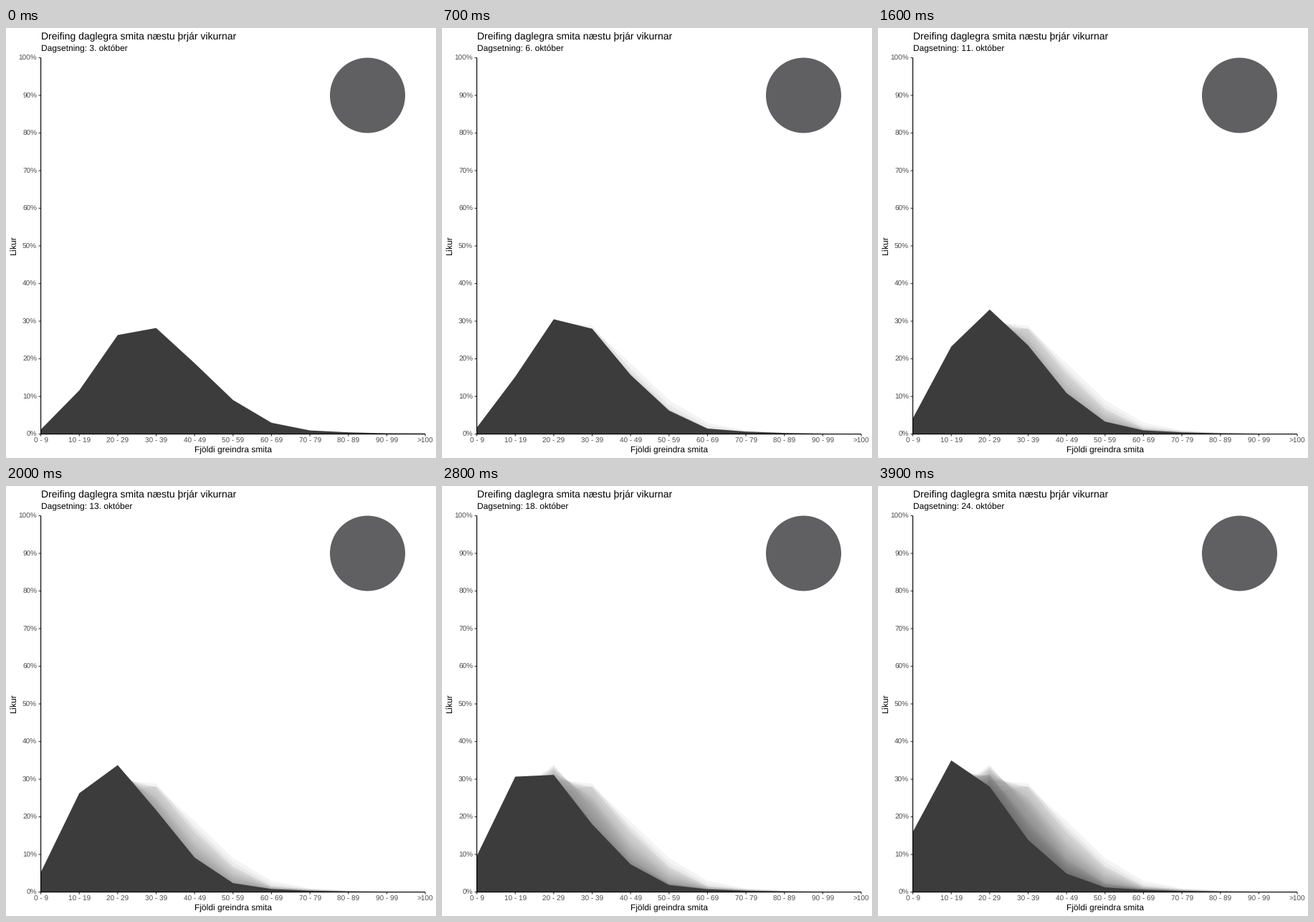
Write a matplotlib script that moves like this. It is 600 px wide and 600 px high and loops after 4 s.

```python
from math import erf, sqrt

import numpy as np
import matplotlib.pyplot as plt
from matplotlib.animation import FuncAnimation
from matplotlib.patches import Circle, Polygon

plt.rcParams["font.family"] = "Liberation Sans"
plt.rcParams["text.hinting"] = "none"
plt.rcParams["text.hinting_factor"] = 1

FRAMES, LAST_DAY, FIRST_DATE = 40, 21, 3
LEFT, RIGHT, TOP, BOTTOM = 48.6, 585, 41.5, 566.6
BIN_X = np.linspace(LEFT, RIGHT, 11)
EDGES = np.arange(10, 101, 10)

# The root of the daily count is roughly normal: its centre falls over
# three weeks while its sharpness wavers and then drops.
DAYS = [0, 2, 3, 6, 11, 13, 17, 21]
CENTRE = [5.80, 5.57, 5.62, 5.34, 5.01, 4.87, 4.69, 4.44]
SHARPNESS = [0.855, 0.875, 0.90, 0.855, 0.87, 0.805, 0.81, 0.778]


def bin_percents(day):
    centre = np.interp(day, DAYS, CENTRE)
    sharpness = np.interp(day, DAYS, SHARPNESS)
    z = sharpness * (np.sqrt(EDGES) - centre)
    z = np.minimum(z, 0.78 + 0.6 * z)  # heavier upper tail
    below = [0.5 + 0.5 * erf(v / sqrt(2)) for v in z]
    return 100 * np.diff([0, *below, 1])


def y_of(percent):
    return BOTTOM - (BOTTOM - TOP) * percent / 100


def outline(day):
    """Area under the curve, linear between whole days."""
    start = min(int(day), LAST_DAY - 1)
    part = day - start
    values = (1 - part) * bin_percents(start) + part * bin_percents(start + 1)
    top = np.column_stack([BIN_X, y_of(values)])
    return np.vstack([[LEFT, BOTTOM], top, [RIGHT, BOTTOM]])


fig = plt.figure(figsize=(6, 6), dpi=100, facecolor="white")
ax = fig.add_axes([0, 0, 1, 1])
ax.set(xlim=(0, 600), ylim=(600, 0))
ax.axis("off")


def label(x, y, text, px, color="black", **kw):
    return ax.text(x, y, text, fontsize=px * 0.72, color=color,
                   va="baseline", **kw)


def line(xs, ys, color="black", px=1.16):
    ax.plot(xs, ys, color=color, lw=px * 0.72, zorder=5,
            solid_capstyle="butt", snap=False)


# Past days stay behind as faint layers.
shadows = [
    ax.add_patch(Polygon(outline(day), fc="#333333", alpha=0.05, lw=0,
                         zorder=1))
    for day in range(LAST_DAY)
]
area = ax.add_patch(Polygon(outline(0), fc="#3c3c3c", lw=0, zorder=2))

for percent in range(0, 101, 10):
    y = y_of(percent)
    line([LEFT - 3, LEFT], [y, y], "#333333")
    label(LEFT - 5.5, y + 3.5, f"{percent}%", 9.6, "#4d4d4d", ha="right")

for i, x in enumerate(BIN_X):
    line([x, x], [BOTTOM, BOTTOM + 3], "#333333")
    name = f"{10 * i} - {10 * i + 9}" if i < 10 else ">100"
    label(x, 579, name, 9.6, "#4d4d4d", ha="center")

line([LEFT, LEFT], [TOP, BOTTOM + 0.5])
line([LEFT - 0.5, RIGHT], [BOTTOM, BOTTOM])

label(LEFT, 16, "Dreifing daglegra smita næstu þrjár vikurnar", 14.4)
subtitle = label(LEFT, 33, "", 12)
label((LEFT + RIGHT) / 2, 593, "Fjöldi greindra smita", 12, ha="center")
label(13.7, (TOP + BOTTOM) / 2, "Líkur", 12, ha="center",
      rotation=90, rotation_mode="anchor")

ax.add_patch(Circle((504.5, 94), 52.5, fc="#606062", lw=0))


def update(frame):
    day = frame * LAST_DAY / (FRAMES - 1)
    date = FIRST_DATE + frame * LAST_DAY // (FRAMES - 1)
    area.set_xy(outline(day))
    for past, shadow in enumerate(shadows):
        shadow.set_visible(past < day)
    subtitle.set_text(f"Dagsetning: {date}. október")
    return [area, subtitle, *shadows]


anim = FuncAnimation(fig, update, frames=FRAMES, interval=100, repeat=True)
plt.show()
```
